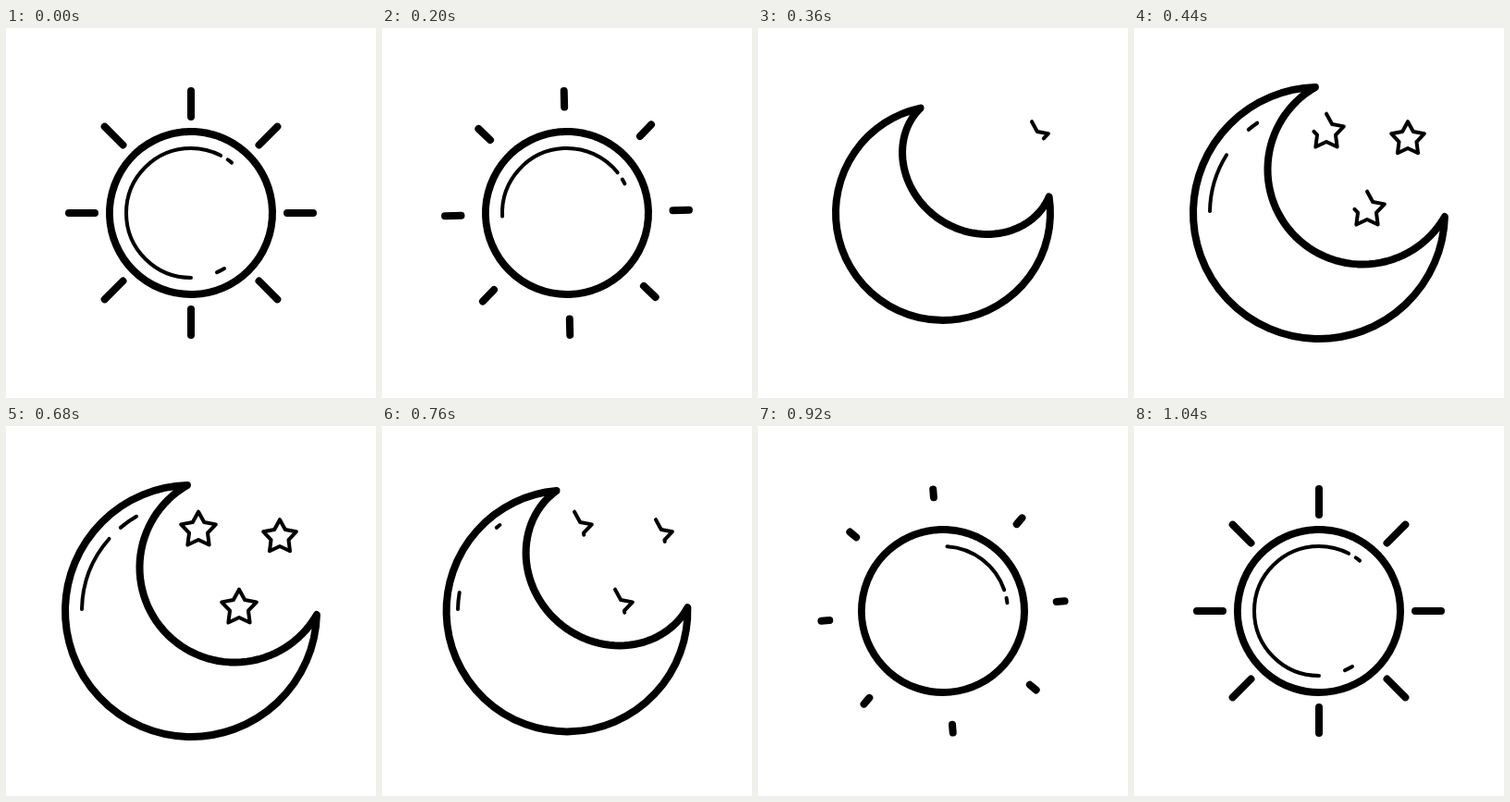
Write an HTML page with a canvas that moves like this. It is 400 px wide and 400 px high and loops after 1120 ms.

```html
<!DOCTYPE html>
<html lang="en">
<head>
<meta charset="utf-8">
<title>Sun and moon</title>
<style>
  html, body { margin: 0; width: 100%; height: 100%; overflow: hidden; background: #fff; }
  canvas { display: block; width: 400px; height: 400px; }
</style>
</head>
<body>
<canvas id="stage" width="400" height="400"></canvas>
<script>
const ctx = document.getElementById('stage').getContext('2d');
const LOOP = 1120, STEP = 40;
const RAD = Math.PI / 180;

const clamp = (v, lo, hi) => Math.min(hi, Math.max(lo, v));
const mix = (a, b, k) => a + (b - a) * k;
// Smooth ease of s from 0 at a to 1 at b
const ease = (s, a, b) => {
  const k = clamp((s - a) / (b - a), 0, 1);
  return k * k * (3 - 2 * k);
};

// Centre x, centre y, radius
const STARS = [[296, 120, 18.8], [208, 112.5, 19.8], [252, 196.5, 19.8]];
// Start and end angles of the gloss strokes
const SUN_GLOSS = [[59, 66.4], [90, 297.3], [304.6, 309]];
const MOON_GLOSS = [[181, 223], [229.8, 240.4]];

// How far each part has gone at time t
function pose(t) {
  if (t < 680) {
    const s = clamp(Math.floor((t - 80) / STEP), 0, 11);
    const late = ease(s, 7, 10);
    return {
      sunOut: ease(s, 0.5, 6.5),
      grow: ease(s, 4.5, 9),
      bite: ease(s, 4, 8),
      swing: 25,
      gloss: [late, ease(s, 7, 10.8)],
      stars: [ease(s, 6, 9), late, late]
    };
  }
  const s = clamp(Math.floor((t - 640) / STEP), 0, 10);
  const shine = 1 - ease(s, 0.6, 4);
  const star = 1 - ease(s, 1, 4.2);
  return {
    sunOut: 1 - ease(s, 5.2, 10),
    grow: 1 - ease(s, 2, 6.7),
    bite: 1 - ease(s, 2, 6.7),
    swing: 28.6,
    gloss: [shine, shine],
    stars: [star, star, star]
  };
}

function arc(r, from, to) {
  if (to - from < 0.2) return;
  ctx.beginPath();
  ctx.arc(200, 200, r, from * RAD, to * RAD);
  ctx.stroke();
}

// Circle whose cap bends inwards into a crescent
function drawBody({ grow, bite, swing }) {
  const r = mix(88, 136, grow), half = 46.7;
  const hollow = { x: 0.489, r: 0.754, tip: 74.9 };
  const span = 360 - 2 * hollow.tip;
  ctx.save();
  ctx.translate(200, 200);
  ctx.rotate((-45 - swing * (1 - grow)) * RAD);
  ctx.beginPath();
  ctx.arc(0, 0, r, half * RAD, (360 - half) * RAD);
  for (let i = 1; i < 60; i++) {
    const k = i / 60;
    const a = mix(-half, half, k) * RAD;
    const b = (-hollow.tip - span * k) * RAD;
    ctx.lineTo(
      r * mix(Math.cos(a), hollow.x + hollow.r * Math.cos(b), bite),
      r * mix(Math.sin(a), hollow.r * Math.sin(b), bite)
    );
  }
  ctx.closePath();
  ctx.lineWidth = 8;
  ctx.stroke();
  ctx.restore();
}

function drawRays(out) {
  if (out > 0.995) return;
  ctx.save();
  ctx.translate(200, 200);
  ctx.rotate(-10 * out * out * RAD);
  ctx.lineWidth = 8;
  ctx.beginPath();
  for (let i = 0; i < 8; i++) {
    const x = Math.cos(i * Math.PI / 4), y = Math.sin(i * Math.PI / 4);
    const inner = mix(104, 132, out);
    ctx.moveTo(132 * x, 132 * y);
    ctx.lineTo(inner * x, inner * y);
  }
  ctx.stroke();
  ctx.restore();
}

function drawSunGloss(out) {
  const cut = mix(59, 309, out), turn = 64 * out;
  for (const [from, to] of SUN_GLOSS) {
    arc(70, Math.max(from, cut) + turn, to + turn);
  }
}

// Outline drawn clockwise from the top, up to the given share
function drawStar([x, y, r], share) {
  if (share <= 0) return;
  const point = i => {
    const d = i % 2 ? r * 0.53 : r, a = (i * 36 - 90) * RAD;
    return [x + d * Math.cos(a), y + d * Math.sin(a)];
  };
  const edges = share * 10, whole = Math.floor(edges);
  ctx.beginPath();
  ctx.moveTo(...point(0));
  for (let i = 1; i <= whole; i++) ctx.lineTo(...point(i));
  if (share >= 1) {
    ctx.closePath();
  } else {
    const a = point(whole), b = point(whole + 1), k = edges - whole;
    ctx.lineTo(mix(a[0], b[0], k), mix(a[1], b[1], k));
  }
  ctx.stroke();
}

function draw(t) {
  const p = pose(t);
  ctx.fillStyle = '#fff';
  ctx.fillRect(0, 0, 400, 400);
  ctx.strokeStyle = '#000';
  ctx.lineCap = ctx.lineJoin = 'round';
  drawRays(p.sunOut);
  drawBody(p);
  ctx.lineWidth = 4;
  drawSunGloss(p.sunOut);
  MOON_GLOSS.forEach(([from, to], i) => arc(118, from, mix(from, to, p.gloss[i])));
  STARS.forEach((star, i) => drawStar(star, p.stars[i]));
}

const start = performance.now();
function tick() {
  draw((performance.now() - start) % LOOP);
  requestAnimationFrame(tick);
}
tick();
</script>
</body>
</html>
```
